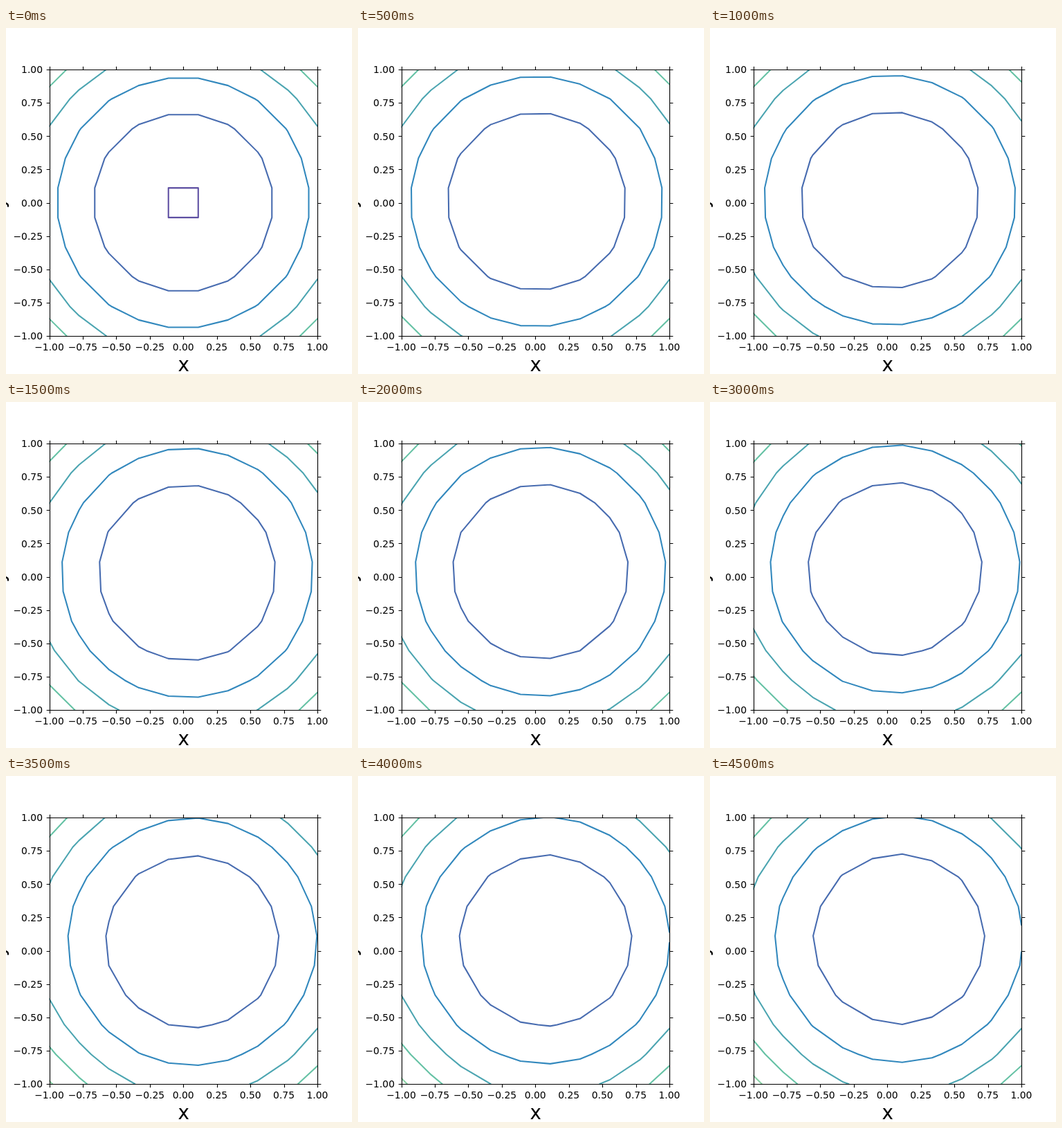
An HTML page that plays this animation: 500x500 px, repeating every 5 s.

```html
<!DOCTYPE html>
<html lang="en">
<head>
<meta charset="utf-8">
<title>Contour plot</title>
<style>
  html, body { margin: 0; width: 100%; height: 100%; overflow: hidden; background: #fff; }
  svg { display: block; width: 500px; height: 500px; }
  text { font: 13.89px "DejaVu Sans", sans-serif; }
  .axis-label { font-size: 27.78px; text-anchor: middle; }
  .frame { fill: none; stroke: #000; stroke-width: 1.11; }
  .contours { fill: none; stroke-width: 2.08; stroke-linecap: round; }
</style>
</head>
<body>
<svg viewBox="0 0 500 500">
  <clipPath id="plot"><rect x="62.5" y="60" width="387.5" height="385"/></clipPath>
  <g class="contours" clip-path="url(#plot)"></g>
  <path class="frame"/>
  <g class="labels"></g>
  <text class="axis-label" x="256.7" y="496">x</text>
  <text class="axis-label" transform="translate(-2.5 252.5) rotate(-90)">y</text>
</svg>
<script>
const SIZE = 10, STEPS = 10, STEP_MS = 500;
const COURANT = 0.045, SOURCE = 0.0005;
const LEVEL_GAP = 0.4364;
const COLORS = ['#5e4fa2', '#486cb0', '#3288bd', '#4ca5b1', '#66c2a5', '#89d0a5'];
const LEFT = 62.5, TOP = 60, WIDTH = 387.5, HEIGHT = 385;

const $ = selector => document.querySelector(selector);
const add = (parent, tag, attrs) => {
  const node = document.createElementNS('http://www.w3.org/2000/svg', tag);
  for (const key in attrs) node.setAttribute(key, attrs[key]);
  return parent.appendChild(node);
};

function drawAxes() {
  const snap = v => Math.floor(v + 0.5) + 0.5;
  let d = 'M63.5 60.5H450.5V445.5H63.5Z';
  for (let k = 0; k <= 8; k++) {
    const x = LEFT + WIDTH * k / 8, y = TOP + HEIGHT * k / 8;
    d += `M${snap(x)} 445.5v4.86M${snap(x)} 60.5v-4.86`;
    d += `M63.5 ${snap(y)}h-4.86M450.5 ${snap(y)}h4.86`;
    const value = k / 4 - 1;
    const label = v => (v < 0 ? '\u2212' : '') + Math.abs(v).toFixed(2);
    add($('.labels'), 'text', { x, y: 466, 'text-anchor': 'middle' }).textContent = label(value);
    add($('.labels'), 'text', { x: 53, y: y + 5.3, 'text-anchor': 'end' }).textContent = label(-value);
  }
  $('.frame').setAttribute('d', d);
}

// The field is profile(x) + profile(y), carried up and right by an upwind scheme.
const start = Array.from({ length: SIZE }, (_, i) => ((2 * i - 9) / 9) ** 2);
const lowest = 2 * start[4];

function profileAt(step) {
  let u = start;
  for (let n = 0; n < step; n++) {
    u = u.map((v, i) => i
      ? v - COURANT * (v - u[i - 1]) + SOURCE
      : v - COURANT * (u[1] - v));
  }
  return u;
}

function contourPath(u, level) {
  let d = '';
  for (let i = 0; i < SIZE - 1; i++) {
    for (let j = 0; j < SIZE - 1; j++) {
      const corners = [[i, j], [i + 1, j], [i + 1, j + 1], [i, j + 1]];
      const points = [];
      corners.forEach(([ax, ay], k) => {
        const [bx, by] = corners[(k + 1) % 4];
        const za = u[ax] + u[ay], zb = u[bx] + u[by];
        if ((za > level) === (zb > level)) return;
        const f = (level - za) / (zb - za);
        const x = LEFT + WIDTH * (ax + f * (bx - ax)) / (SIZE - 1);
        const y = TOP + HEIGHT * (1 - (ay + f * (by - ay)) / (SIZE - 1));
        points.push(x.toFixed(2) + ' ' + y.toFixed(2));
      });
      if (points.length > 1) d += `M${points[0]}L${points[1]}`;
    }
  }
  return d;
}

drawAxes();
const lines = COLORS.map(stroke => add($('.contours'), 'path', { stroke }));
let shown = -1;

function render(now) {
  const step = Math.floor(now / STEP_MS) % STEPS;
  if (step !== shown) {
    shown = step;
    const u = profileAt(step);
    lines.forEach((line, k) => line.setAttribute('d', contourPath(u, lowest + k * LEVEL_GAP)));
  }
  requestAnimationFrame(render);
}
render(performance.now());
</script>
</body>
</html>
```
